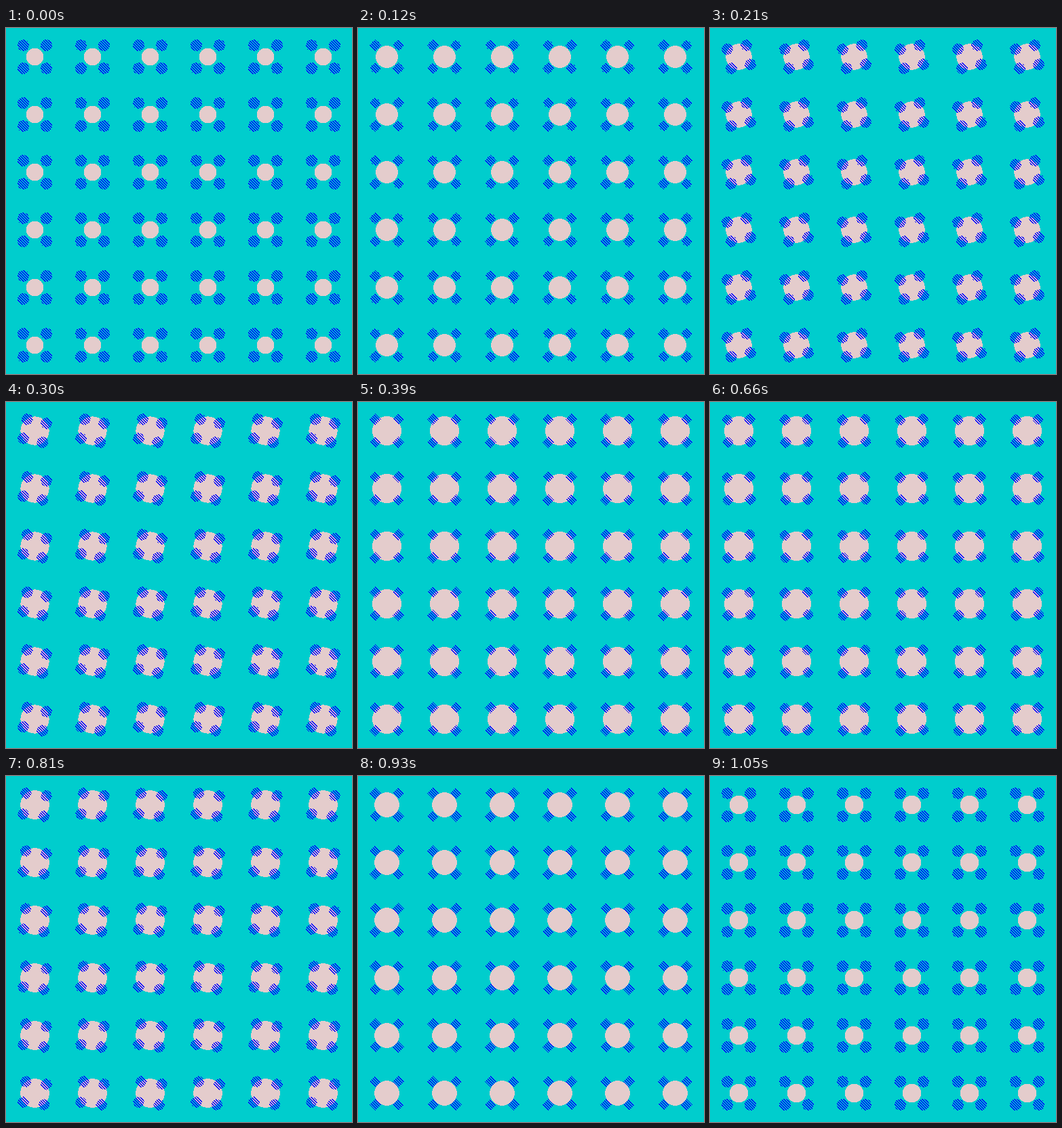
Animation, 510 px wide and 510 px high, one loop 1.08 s. Source, as an HTML page with a canvas:

```html
<!DOCTYPE html>
<html>
<head>
<meta charset="utf-8">
<style>
html, body { margin: 0; height: 100%; overflow: hidden; background: #00cdcd; }
canvas { display: block; }
</style>
</head>
<body>
<canvas id="stage" width="510" height="510"></canvas>
<script>
const SIZE = 510, CELL = 85, STEP = 30, STEPS = 36;
const REACH = 17, RADIUS = 8.5, HATCH = 4;

const ctx = document.getElementById('stage').getContext('2d');
const image = ctx.createImageData(SIZE, SIZE);
const pixels = new Uint32Array(image.data.buffer);

// Colours as little-endian ABGR, for hard pixel edges.
const TEAL = 0xffcdcd00, PINK = 0xffcccce4, BLUE = 0xffff0000;

const clamp = v => Math.min(1, Math.max(0, v));
const mix = (a, b, k) => a + (b - a) * k;
const smooth = u => u * u * (3 - 2 * u);
const cubic = u => u < 0.5 ? 4 * u ** 3 : 1 - 4 * (1 - u) ** 3;

// Outline between a diamond (round = 0) and a circle (round = 1).
function inPatch(x, y, round) {
  const d = Math.hypot(x, y);
  if (d > RADIUS) return false;
  const diamond = d / (Math.abs(x) + Math.abs(y) || 1);
  return d <= RADIUS * mix(diamond, 1, round);
}

function draw(n) {
  const edge = Math.min(n, STEPS - n);
  const grow = Math.sin(Math.PI / 2 * clamp(edge / (n < 18 ? 12 : 10)) ** 1.2);
  const disc = 12.75 + 8.75 * grow;

  const u = clamp((n - (n < 18 ? 3.5 : 20)) / 10);
  const slide = 2 * REACH * cubic(u);
  const round = Math.max(Math.sin(Math.PI * u) ** 2, 1 - smooth(clamp((edge - 1) / 4)));

  // Patches travel counterclockwise along the sides of a square.
  const a = REACH, b = REACH - slide;
  const spots = [[-a, -b], [b, -a], [a, b], [-b, a]];

  for (let cy = 0; cy < CELL; cy++) {
    for (let cx = 0; cx < CELL; cx++) {
      const x = cx + 0.5 - CELL / 2, y = cy + 0.5 - CELL / 2;
      const base = Math.hypot(x, y) <= disc ? PINK : TEAL;
      const striped = spots.some(([sx, sy]) => inPatch(x - sx, y - sy, round));
      for (let py = cy; py < SIZE; py += CELL) {
        for (let px = cx; px < SIZE; px += CELL) {
          const line = striped && (px - py + SIZE * HATCH) % HATCH < HATCH / 2;
          pixels[py * SIZE + px] = line ? BLUE : base;
        }
      }
    }
  }
  ctx.putImageData(image, 0, 0);
}

const start = performance.now();
let shown = -1;
function tick() {
  const n = Math.floor((performance.now() - start) / STEP) % STEPS;
  if (n !== shown) draw(shown = n);
  requestAnimationFrame(tick);
}
tick();
</script>
</body>
</html>
```
